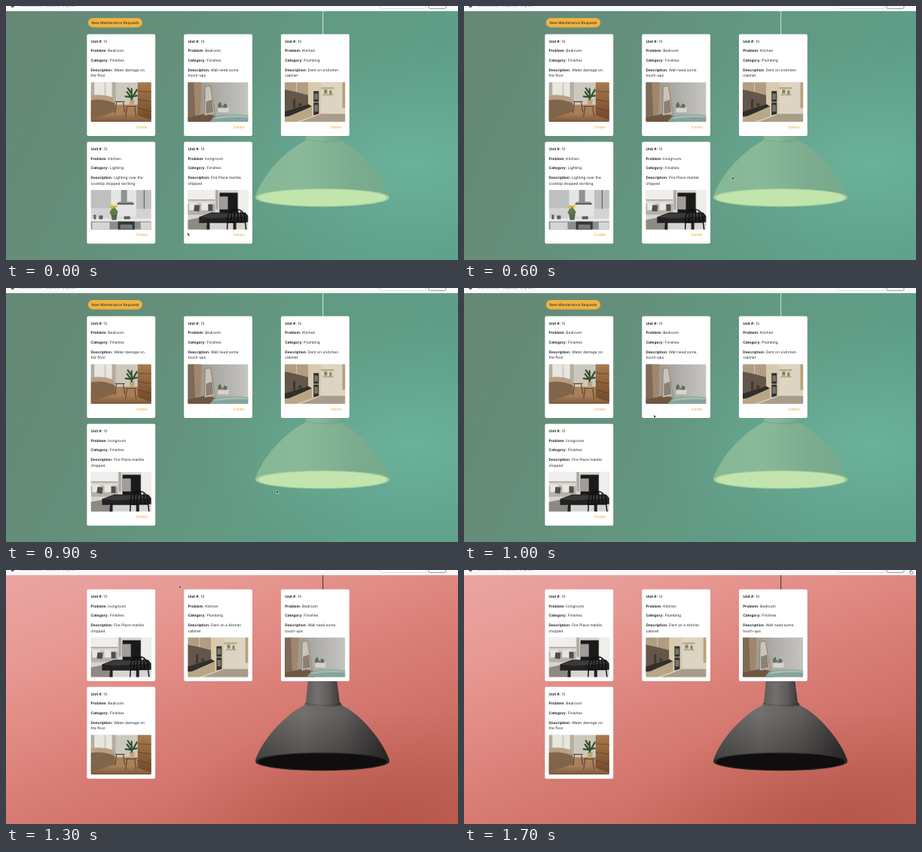
An HTML page that plays this animation: 600x338 px, repeating every 1800 ms.

```html
<!DOCTYPE html>
<html lang="en">
<head>
<meta charset="utf-8">
<title>Maintenance requests</title>
<style>
  html, body { margin: 0; width: 100%; height: 100%; overflow: hidden; background: #fff; }
  svg#stage { display: block; width: 100%; height: 100%; }
  text { font: 4.89px Inter, "Liberation Sans", sans-serif; fill: #212529; text-rendering: geometricPrecision; white-space: pre; }
  .b { font-weight: 700; }
  .delete { fill: #f2a52e; text-anchor: end; }
  .new { font-size: 4.8px; }
</style>
</head>
<body>
<svg id="stage" viewBox="0 0 600 338">
  <defs>
    <linearGradient id="greenWall" x1="0" y1="0" x2="1" y2=".25">
      <stop offset="0" stop-color="#668775"/><stop offset=".35" stop-color="#648f7b"/>
      <stop offset=".7" stop-color="#629a84"/><stop offset="1" stop-color="#5d9f88"/>
    </linearGradient>
    <radialGradient id="greenGlow" cx=".9" cy=".62" r=".48">
      <stop offset="0" stop-color="#70b9a2" stop-opacity=".75"/><stop offset="1" stop-color="#6cb199" stop-opacity="0"/>
    </radialGradient>
    <linearGradient id="pinkWall" x1="0" y1="0" x2=".7" y2="1">
      <stop offset="0" stop-color="#eba6a4"/><stop offset=".3" stop-color="#e6968f"/>
      <stop offset=".5" stop-color="#de867f"/><stop offset=".7" stop-color="#d5786f"/>
      <stop offset="1" stop-color="#c3665b"/>
    </linearGradient>
    <radialGradient id="pinkGlow" cx=".85" cy="1.05" r=".5">
      <stop offset="0" stop-color="#ad4a3f" stop-opacity=".65"/><stop offset="1" stop-color="#b9564a" stop-opacity="0"/>
    </radialGradient>
    <linearGradient id="greenShade">
      <stop offset="0" stop-color="#86b795"/><stop offset=".35" stop-color="#8ab99a"/>
      <stop offset=".7" stop-color="#7dac90"/><stop offset="1" stop-color="#75aa8d"/>
    </linearGradient>
    <linearGradient id="pinkShade">
      <stop offset="0" stop-color="#5d5b59"/><stop offset=".35" stop-color="#72706d"/>
      <stop offset=".65" stop-color="#605e5c"/><stop offset="1" stop-color="#343231"/>
    </linearGradient>
    <linearGradient id="shadow" x2="0" y2="1">
      <stop offset=".15" stop-opacity="0"/><stop offset="1"/>
    </linearGradient>
    <linearGradient id="wood" x2="0" y2="1">
      <stop offset="0" stop-color="#a87b4e"/><stop offset="1" stop-color="#71482a"/>
    </linearGradient>
    <linearGradient id="boards" x2="0" y2="1">
      <stop offset=".5" stop-color="#a8805a"/><stop offset="1" stop-color="#7b5638"/>
    </linearGradient>
    <linearGradient id="plaster" x2="1">
      <stop offset="0" stop-color="#918b82"/><stop offset=".5" stop-color="#aeaca7"/><stop offset="1" stop-color="#c5c4c0"/>
    </linearGradient>
    <clipPath id="photoClip"><rect x="5" y="63.7" width="80.5" height="53.3" rx="1.3"/></clipPath>

    <symbol id="floor" viewBox="0 0 80 53" preserveAspectRatio="none">
      <path fill="#cdc8be" d="M0 0h80v53H0z"/>
      <path fill="#b3aca0" d="M0 0h5v20H0zM28 0h5v26h-5z"/>
      <path fill="#e9e6df" d="M5 0h13v18H5zM20 0h8v20h-8z"/>
      <path fill="url(#boards)" d="M0 38L34 30h46v23H0z"/>
      <path fill="#b79f84" d="M0 18q14-3 29 2l3 8v10L0 47z"/>
      <path fill="#80654a" d="M0 24q16-3 32 4v11L0 50z"/>
      <path fill="none" stroke="#65432a" stroke-width="1.2" d="M32 26h13M34 27l-2 14M43 27l2 13M46 32h14M48 33l-2 13M58 33l2 13"/>
      <path fill="#c0a27b" d="M51 23h7l-1 8h-5z"/>
      <path fill="none" stroke="#34502f" stroke-width="2.2" stroke-linecap="round" d="M54 23V9M54 21l-6-8M54 22l7-12M54 20l-8-1M54 19l7-1M53 14l-4-6"/>
      <path fill="url(#wood)" d="M62 0h18v50l-18-6z"/>
      <path stroke="#5a3a21" stroke-width=".7" d="M62 12l18 1M62 23l18 3M62 34l18 5"/>
    </symbol>

    <symbol id="wall" viewBox="0 0 80 53" preserveAspectRatio="none">
      <path fill="url(#plaster)" d="M0 0h80v53H0z"/>
      <path fill="#7d6a58" d="M0 0h9l1 47-10 3z"/>
      <path fill="#a1866a" d="M8 0h10l-1 41-7 5z"/>
      <path fill="#6f5640" d="M0 47l22-5 18 3v8H0z"/>
      <path fill="#c6c4be" stroke="#9a7850" stroke-width=".9" d="M23 6l7-1 6 37-14 2z"/>
      <path fill="#8b8074" d="M24 26l8-3 2 17-10 2z"/>
      <path fill="#d6d4cf" d="M40 33h14v7H40z"/>
      <path fill="#52725f" d="M40 29l3-3 2 5-2 3h-3zM48 28l4 2v4h-5z"/>
      <path fill="#a06e60" d="M44 31h4v3h-4z"/>
      <path fill="#84a39a" d="M29 53l6-8q22-4 45-1v9z"/>
      <path fill="#a5bcb3" d="M38 46q22-4 42-1v2q-24-2-46 2z"/>
    </symbol>

    <symbol id="cabinet" viewBox="0 0 80 53" preserveAspectRatio="none">
      <path fill="#d5c9b1" d="M0 0h80v53H0z"/>
      <path fill="#65564a" d="M0 9l31 8v15L0 44z"/>
      <path fill="#b09d82" d="M0 0h15v13L0 10zM16 0h15v17l-15-4z"/>
      <path fill="#312e2b" d="M0 39l32-10 4 3L6 46H0z"/>
      <path fill="#b9a687" d="M6 45l31-13v13L14 53H0v-7z"/>
      <path fill="#d8cbad" d="M31 0h16v44l-11 3V32l-5-3z"/>
      <path fill="#312f2e" d="M38 12h7v14h-7zM38 27h7v15l-7 2z"/>
      <path fill="#77736d" d="M39 15h5v8h-5zM39 30h5v9h-5z"/>
      <path fill="#ddd4c3" d="M48 0h32v43H48z"/>
      <path fill="#b8a177" d="M48 7h17v2H48zM50 16h14v1.5H50zM76 0h4v34h-4z"/>
      <path fill="#7c8960" d="M52 10h4v5h-4zM59 11h3v5h-3z"/>
      <path fill="#a99c8a" d="M36 47l12-5h32v11H20z"/>
      <path fill="#40392f" d="M11 23l3-1v12l-3 1zM18 28h4v4h-4z"/>
    </symbol>

    <symbol id="cooktop" viewBox="0 0 80 53" preserveAspectRatio="none">
      <path fill="#d2d3d2" d="M0 0h80v53H0z"/>
      <path fill="#bec0c0" d="M0 0h27v24H0zM60 0h20v25H60z"/>
      <path fill="#e4e5e4" d="M27 0h33v36H27z"/>
      <path fill="#8e9291" d="M40 0h8v16h7l2 3H35l2-3h3z"/>
      <path fill="#4b4e4e" d="M35 18h22v1.6H35zM70 0h1v25h-1z"/>
      <path fill="#e9eae8" d="M0 38h80v4H0z"/>
      <path fill="#8b8e8d" d="M0 42h80v11H0z"/>
      <path fill="#d4d6d5" d="M2 43h23v10H2zM66 43h14v10H66z"/>
      <path fill="#333736" d="M36 42h22v11H36z"/>
      <path fill="#747a78" d="M39 46h16v6H39z"/>
      <path fill="#607b45" d="M25 30l5-9 6 8-2 6h-6z"/>
      <circle cx="28" cy="23" r="2.3" fill="#d6b73c"/><circle cx="33" cy="22" r="2.2" fill="#e0c54a"/>
      <path fill="#5b635d" d="M27 33h8l-1 7h-6zM44 35h8v4h-8zM4 33h3v6H4zM11 34h5v5h-5z"/>
    </symbol>

    <symbol id="marble" viewBox="0 0 80 53" preserveAspectRatio="none">
      <path fill="#d6d4d0" d="M0 0h80v53H0z"/>
      <path fill="#efeeeb" d="M0 0h36v13H0zM67 0h13v34H67z"/>
      <path fill="#aaa59d" d="M37 0h3v26h-3zM0 13h36v1.5H0z"/>
      <path fill="#b5b0a9" d="M0 19h36v14H0z"/>
      <path fill="#e8e6e1" d="M2 17h10v10H2zM18 17h11v10H18z"/>
      <path fill="#514d49" d="M9 20l7 1-1 8-7-1zM27 19l6 1v8h-6z"/>
      <path fill="#191a1a" d="M42 4h24v28H42z"/>
      <path fill="#a19d97" d="M42 9h11v17H42z"/>
      <path fill="#8d8983" d="M0 40l20-4 8 17H0z"/>
      <path fill="#222122" d="M15 36l16-6h45l4 5v8H64v10h-4V44H29v9h-4v-9H15z"/>
      <path fill="#3b3a3a" d="M16 36l16-5h42l3 4-44 3z"/>
      <path fill="none" stroke="#0d0d0d" stroke-width="1.4" d="M52 53l1-18q2-9 11-9t11 9l2 18M53 43h23M57 43l1-14M61 43l1-16M66 43V27M71 43l-1-14"/>
    </symbol>
  </defs>
</svg>
<script>
const NS = 'http://www.w3.org/2000/svg';
const stage = document.getElementById('stage');

function add(parent, tag, attrs = {}, content = '') {
  const el = document.createElementNS(NS, tag);
  for (const k in attrs) el.setAttribute(k, attrs[k]);
  el.textContent = content;
  parent.append(el);
  return el;
}
const show = (el, on) => el.setAttribute('display', on ? 'inline' : 'none');
const move = (el, x, y) => el.setAttribute('transform', `translate(${x} ${y})`);

const requests = {
  floor: ['Bedroom', 'Finishes', 'Water damage on', 'the floor'],
  wall: ['Bedroom', 'Finishes', 'Wall need some', 'touch-ups'],
  cabinet: ['Kitchen', 'Plumbing', 'Dent on a kitchen', 'cabinet'],
  cooktop: ['Kitchen', 'Lighting', 'Lighting over the', 'cooktop stopped working'],
  marble: ['livingroom', 'Finishes', 'Fire Place marble', 'chipped']
};

function scene(name, look) {
  const g = add(stage, 'g');
  const fill = { x: 0, y: 0, width: 600, height: 338 };
  add(g, 'rect', { ...fill, fill: `url(#${name}Wall)` });
  add(g, 'rect', { ...fill, fill: `url(#${name}Glow)` });
  add(g, 'path', { d: 'M420.7 7V150', stroke: look.wire, 'stroke-width': 1 });
  const shade = `url(#${name}Shade)`;
  const dome = 'M396 180C372 192 342 222 331 253A89 12 0 0 0 509 253C498 222 467 190 446 180Q421 186 396 180Z';
  add(g, 'path', { d: 'M401 145H439L443 176Q446 178 446 183H396Q396 178 398 176Z', fill: shade });
  add(g, 'path', { d: dome, fill: shade });
  add(g, 'path', { d: dome, fill: 'url(#shadow)', opacity: look.shadow });
  add(g, 'path', { d: 'M397 177Q421 184 445 177', fill: 'none', stroke: look.edge, 'stroke-width': .8, opacity: .6 });
  add(g, 'ellipse', { cx: 420, cy: 255, rx: 89, ry: 12.2, fill: look.rim });
  add(g, 'ellipse', { cx: 420, cy: 255, rx: 85.5, ry: 11, fill: look.mouth });
  return g;
}

function card(parent, key, canDelete) {
  const [problem, category, line1, line2] = requests[key];
  const g = add(parent, 'g');
  const h = canDelete ? 135.4 : 122.2;
  add(g, 'rect', { y: .4, width: 90.8, height: h, rx: 2, fill: '#000', opacity: .08 });
  add(g, 'rect', { width: 90.8, height: h, rx: 2, fill: '#fff' });
  const rows = [['Unit #:', '10', 11.1], ['Problem:', problem, 23.9], ['Category:', category, 36.5], ['Description:', line1, 49.3]];
  for (const [label, value, y] of rows) {
    const t = add(g, 'text', { x: 5.2, y });
    add(t, 'tspan', { class: 'b' }, label);
    add(t, 'tspan', {}, ' ' + value);
  }
  add(g, 'text', { x: 5.2, y: 56.9 }, line2);
  const clip = add(g, 'g', { 'clip-path': 'url(#photoClip)' });
  add(clip, 'use', { href: '#' + key, x: 5, y: 63.7, width: 80.5, height: 53.3 });
  if (canDelete) add(g, 'text', { x: 80.5, y: 125.6, class: 'delete' }, 'Delete');
  return g;
}

const place = (el, slot, top, pitch) =>
  move(el, 107.4 + slot % 3 * 128.8, top + Math.floor(slot / 3) * pitch);

// Page with requests that can be deleted
const green = scene('green', { wire: '#d5e5da', edge: '#5f9278', rim: '#a3cf9f', mouth: '#c1e5ac', shadow: 0 });
const open = {};
['floor', 'wall', 'cabinet', 'cooktop', 'marble'].forEach((key, i) => {
  open[key] = card(green, key, true);
  place(open[key], i, 37.6, 143.2);
});
const button = add(green, 'rect', { x: 109, y: 16, width: 72, height: 12.4, rx: 6.2 });
add(green, 'text', { x: 113.4, y: 24, class: 'new' }, 'New Maintenance Requests');

// Page with the new requests
const pink = scene('pink', { wire: '#3b3030', edge: '#363433', rim: '#2b2928', mouth: '#0f0d0d', shadow: .35 });
['marble', 'cabinet', 'wall', 'floor'].forEach((key, i) =>
  place(card(pink, key, false), i, 25.7, 129.8));

// Lower edge of the navigation bar
const nav = add(stage, 'g');
add(nav, 'rect', { width: 600, height: 6.8, fill: '#f8f9fa' });
add(nav, 'circle', { cx: 8.7, cy: -.2, r: 2.3, fill: '#55585b' });
add(nav, 'text', { x: 18, y: .7, opacity: .45 }, 'Maintenance  Requests  Log out');
add(nav, 'rect', { x: 497, y: -9, width: 60.5, height: 12.4, rx: 1.5, fill: '#fff', stroke: '#ced4da', 'stroke-width': .7 });
add(nav, 'rect', { x: 561, y: -9, width: 23, height: 12.4, rx: 1.5, fill: '#f8f9fa', stroke: '#6c757d', 'stroke-width': .7 });

const cursor = add(stage, 'g', { stroke: '#fff', 'stroke-width': .5 });
const arrow = add(cursor, 'path', { d: 'M0 -1.5V3L1.1 2.1L1.9 3.8L2.7 3.4L1.9 1.8H3.2Z', fill: '#111' });
const hand = add(cursor, 'path', {
  d: 'M-.4 -1.8Q.3 -2.3 .7 -1.6V.2L2.7 .7Q3.2 1 3 2L2.5 3.6H-.3L-1.8 1.2Q-1.3 .7 -.4 1.4Z',
  fill: '#fff', stroke: '#222'
});

// x, y, pointing hand; null while the pointer is hidden
const path = [
  [241, 303], [205, 305], [183, 305, 1], null, [232, 284], [312, 249],
  [356, 228.5], [359, 243], [360, 262], [359, 270.5], [252, 170], [150, 50],
  [122, 24, 1], [229.5, 21.5], [400, 12], [530, 5], [584, 3], [593, 1.5, 1]
];
const STEP = 100, DELETED = 8, HOVER = 12, PAGE_CHANGE = 13;

function draw(now) {
  const n = Math.floor(now / STEP) % path.length;
  const deleted = n >= DELETED, changed = n >= PAGE_CHANGE;
  show(green, !changed);
  show(pink, changed);
  show(open.cooktop, !deleted);
  place(open.marble, deleted ? 3 : 4, 37.6, 143.2);
  button.setAttribute('fill', n === HOVER ? '#ffbf2c' : '#efb341');
  const p = path[n];
  show(cursor, p);
  if (p) {
    move(cursor, p[0], p[1]);
    show(arrow, !p[2]);
    show(hand, p[2]);
  }
}

const start = performance.now();
function tick() {
  draw(performance.now() - start);
  requestAnimationFrame(tick);
}
tick();
</script>
</body>
</html>
```
